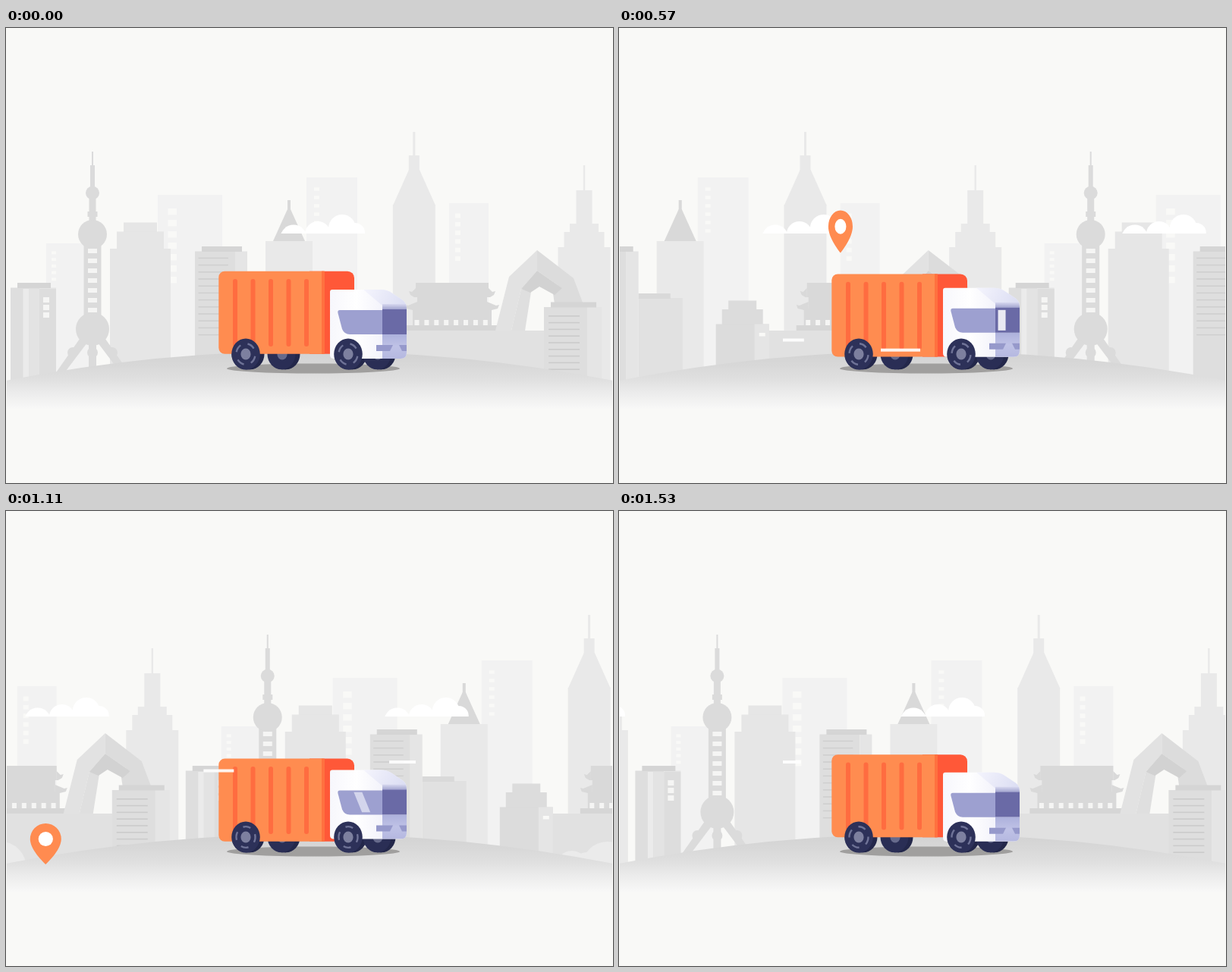
An HTML page with a canvas for the animation above (1560 ms loop, 800 by 600 pixels).

```html
<!DOCTYPE html>
<html lang="en">
<head>
<meta charset="utf-8">
<title>Delivery truck</title>
<style>
html, body { margin: 0; width: 100%; height: 100%; overflow: hidden; background: #f9f9f7; }
canvas { display: block; }
</style>
</head>
<body>
<canvas id="stage" width="800" height="600"></canvas>
<script>
const ctx = document.getElementById('stage').getContext('2d');
const LOOP = 1560, STEP = 30, PAPER = '#f9f9f7', PANE = '#f5f5f4', FLOOR = 468;

function box(color, left, top, right, bottom = FLOOR) {
  ctx.fillStyle = color;
  ctx.fillRect(left, top, right - left, bottom - top);
}
function rounded(color, left, top, right, bottom, radii) {
  ctx.fillStyle = color;
  ctx.beginPath();
  ctx.roundRect(left, top, right - left, bottom - top, radii);
  ctx.fill();
}
function poly(color, ...p) {
  ctx.fillStyle = color;
  ctx.beginPath();
  for (let i = 0; i < p.length; i += 2) ctx.lineTo(p[i], p[i + 1]);
  ctx.fill();
}
function oval(color, x, y, rx, ry = rx) {
  ctx.fillStyle = color;
  ctx.beginPath();
  ctx.ellipse(x, y, rx, ry, 0, 0, Math.PI * 2);
  ctx.fill();
}
function rows(color, left, right, top, height, pitch, count) {
  for (let i = 0; i < count; i++) box(color, left, top + i * pitch, right, top + i * pitch + height);
}
function fade(x0, y0, x1, y1, ...colors) {
  const g = ctx.createLinearGradient(x0, y0, x1, y1);
  colors.forEach((c, i) => g.addColorStop(i / (colors.length - 1), c));
  return g;
}
function clipped(left, top, width, height, paint) {
  ctx.save();
  ctx.beginPath();
  ctx.rect(left, top, width, height);
  ctx.clip();
  paint();
  ctx.restore();
}

function slab(left, top, right, paneX, paneWidth, paneHeight, pitch, count) {
  box('#f2f2f2', left, top, right);
  rows(PAPER, paneX, paneX + paneWidth, top + pitch * 1.2, paneHeight, pitch, count);
}
// Symmetric tower of ever wider tiers, given as pairs of half width and top
function tiers(color, x, ...steps) {
  for (let i = 0; i < steps.length; i += 2) box(color, x - steps[i], steps[i + 1], x + steps[i]);
}
function office(left, edge, right, top) {
  box('#dedede', left, top + 6.5, edge);
  box('#e5e5e5', edge, top + 6.5, right);
  box('#d5d5d5', left + 9, top, right - 7, top + 7);
}

function farSkyline() {
  slab(53, 284, 110, 60, 6, 4, 8.7, 5);
  slab(200, 220, 285, 213.5, 11.5, 8.5, 15, 7);
  slab(396, 197, 463, 406, 7, 4.5, 11, 6);
  slab(584, 231, 636, 592, 7, 6, 11.3, 6);
  tiers('#e9e9e9', 762, 1.2, 181, 10.5, 214, 19, 258, 26.5, 269, 34.5, 289);
  tiers('#e6e6e6', 177, 22, 256.5, 31, 268.5, 40, 291);
  tiers('#e9e9e9', 537.8, 1.5, 137, 7, 168, 28, 233);
  poly('#e9e9e9', 531, 187, 545, 187, 566, 234, 510, 234);
  box('#e9e9e9', 342, 281, 404);
  box('#d9d9d9', 371, 227, 375, 245);
  poly('#d9d9d9', 371, 239, 375, 239, 394, 281, 352, 281);
}

function pearlTower() {
  const c = '#dbdbdb';
  ctx.save();
  ctx.translate(114, 0);
  tiers(c, 0, 1, 163);
  box(c, -3, 181, 3, 212);
  box(c, -4.5, 217, 4.5, 272);
  box(c, -6.5, 242, 6.5, 249);
  box(c, -11.5, 286, 11.5, 380);
  oval(c, 0, 217.5, 9);
  oval(c, 0, 272, 19);
  oval(c, 0, 397, 22);
  rows(PANE, -6, 6, 291, 6, 13, 7);
  box(c, -5, 415, 5);
  for (const side of [-1, 0, 1]) {
    oval(c, side * 26, 428, 7);
    poly(c, side * 17, 410, side * 7, 415, side * 41, 460, side * 52, 460);
  }
  ctx.restore();
}

function nearSkyline() {
  office(249, 302, 318, 288);
  rows('#cfcfcf', 253.5, 293, 302.6, 1.6, 9.2, 12);
  box('#e1e1e1', 318, 356, 376);
  box('#d9d9d9', 318, 350, 360, 357);
  tiers('#dcdcdc', 455, 18.5, 359.5, 27, 371, 35, 390.5);
  box('#e5e5e5', 471, 390.5, 490);
  box(PAPER, 477, 402, 485, 406.5);
  office(6, 44, 66, 336);
  box('#ebebeb', 22.5, 344, 30);
  box('#e3e3e3', 30, 344, 44);
  box('#dddddd', 44, 344, 66);
  rows(PANE, 49, 57, 355, 7, 10, 3);
}

function roof(top, half, eave, reach) {
  const c = '#d9d9d9', x = 588;
  box(c, x - half, top, x + half, eave + 5);
  for (const s of [-1, 1]) {
    poly(c, x + s * half, eave - 7, x + s * (reach - 4), eave - 2, x + s * reach, eave - 3,
      x + s * (reach - 2), eave + 2, x + s * (half + 2), eave + 5, x + s * half, eave + 5);
  }
}
function gate() {
  box('#e1e1e1', 490, 399, 727);
  roof(336, 48, 350, 57);
  roof(352, 46, 368, 62);
  box('#d9d9d9', 536, 370, 640, 393);
  for (let x = 538.5; x < 635; x += 12.9) box(PANE, x, 385, x + 6, 392);
  box('#d6d6d6', 526, 392, 650, 399);
}

function archTower() {
  poly('#e2e2e2', 645, 399, 663, 328, 700, 293, 700, 320, 679, 344, 666, 399);
  poly('#dfdfdf', 666, 399, 679, 344, 692, 348, 684, 399);
  poly('#dcdcdc', 700, 293, 748, 330, 760, 362, 723, 364, 721, 350, 733, 343, 700, 320);
  poly('#d2d2d2', 679, 344, 700, 320, 733, 343, 723, 352, 703, 341, 691, 349);
}

function bushes() {
  oval('#ebebeb', 515, 468, 20);
  oval('#ebebeb', 535, 468, 18);
  oval('#ebebeb', 562, 470, 34);
}

function city(shift) {
  for (const x of [-shift, 800 - shift]) {
    ctx.save();
    ctx.translate(x, 0);
    farSkyline();
    pearlTower();
    nearSkyline();
    gate();
    archTower();
    office(709, 766, 785, 361.5);
    rows('#cbcbcb', 715, 756, 379, 1.6, 8.8, 9);
    bushes();
    ctx.restore();
  }
}

function clouds(t) {
  const gap = 474;
  for (let x = 361 - gap * (1 + t / LOOP); x < 800; x += gap) {
    clipped(x, 240, 113, 31, () => {
      oval('#ffffff', x + 18, 277, 17.5);
      oval('#ffffff', x + 50, 272, 17);
      oval('#ffffff', x + 82, 264, 18);
      oval('#ffffff', x + 99, 270, 13);
      box('#ffffff', x + 35, 265, x + 108, 271);
    });
  }
}

function ground() {
  ctx.fillStyle = fade(0, 426, 0, 502, '#d2d2d2', '#d8d8d8', '#e0e0e0', '#ededed', '#f8f8f7');
  ctx.beginPath();
  ctx.moveTo(0, 502);
  ctx.lineTo(0, 465);
  ctx.quadraticCurveTo(400, 387, 800, 465);
  ctx.lineTo(800, 502);
  ctx.fill();
}

// The pin leaps out of the truck, grows on its way and lands on the road
function pin(t) {
  const landing = 798;
  const x = 203 + (landing - t) * (t < landing ? 0.39 : 0.483);
  const tip = t < landing ? 249.5 + 0.0012 * (t - 372) ** 2 : 466;
  const size = Math.min(1, t / 960) ** 0.47;
  const stretch = t < landing ? 1 + 0.42 * Math.sin(Math.PI * t / landing) : 1;
  ctx.save();
  ctx.translate(x, tip);
  ctx.scale(size, size * stretch);
  ctx.fillStyle = '#ff8b50';
  ctx.beginPath();
  ctx.moveTo(0, 0);
  ctx.bezierCurveTo(-5, -5, -20.5, -20, -20.5, -33.5);
  ctx.arc(0, -33.5, 20.5, Math.PI, 0);
  ctx.bezierCurveTo(20.5, -20, 5, -5, 0, 0);
  ctx.fill();
  oval('#ffffff', 0, -33.5, 9.6);
  ctx.restore();
}

function tread(x, depth) {
  oval('#23274a', x + depth, 430, 18.5, 20.3);
  box('#23274a', x, 409.7, x + depth, 450.3);
  oval('#2a2e55', x, 430, 18.5, 20.3);
}
function wheel(x, angle) {
  oval('#2d3159', x, 430, 18.8, 20.5);
  ctx.strokeStyle = '#6f7397';
  ctx.lineWidth = 2.4;
  for (let a = angle; a < angle + 6; a += Math.PI / 2) {
    ctx.beginPath();
    ctx.ellipse(x, 430, 12.5, 13.8, 0, a - 0.4, a + 0.4);
    ctx.stroke();
  }
  oval('#7d809f', x, 430, 6.6, 7.4);
}

function container() {
  rounded('#ff5838', 400, 320.7, 459, 429.8, [0, 9, 0, 0]);
  rounded('#ff8c50', 280.3, 320.7, 419, 429.8, [8, 0, 0, 8]);
  box('#ff713f', 416, 320.7, 420, 429.8);
  for (let x = 299; x < 400; x += 23.5) rounded('#ff6c40', x, 331, x + 6, 420, 3);
}

// One reflection slides back over the windscreen and then the side window
function glare(t) {
  const x = 548 - t * 0.085;
  clipped(496, 371, 32, 33, () => box('rgba(255,255,255,.85)', x, 374, x + 10, 401));
  clipped(442, 374, 54, 27, () => {
    const left = x + 4.6, width = 14 - Math.max(0, t - 960) * 0.02;
    poly('#d3d5ec', left, 374, left + width, 374, left + width + 11, 401, left + 11, 401);
  });
}

function cab(t) {
  ctx.save();
  ctx.beginPath();
  ctx.moveTo(427, 348);
  ctx.quadraticCurveTo(427, 345, 430, 345);
  ctx.lineTo(494, 345);
  ctx.quadraticCurveTo(502, 345, 508, 349);
  ctx.lineTo(523, 359);
  ctx.quadraticCurveTo(528, 363, 528, 370);
  ctx.lineTo(528, 428);
  ctx.quadraticCurveTo(528, 436, 520, 436);
  ctx.lineTo(432, 436);
  ctx.quadraticCurveTo(427, 436, 427, 431);
  ctx.clip();
  box(fade(427, 0, 496, 0, '#f7f7fc', '#ffffff', '#f3f3fb'), 427, 340, 528, 440);
  poly(fade(470, 345, 520, 372, '#f5f5fd', '#dcdef3'), 470, 344, 528, 344, 528, 366, 496, 366);
  box(fade(0, 363, 0, 372, '#dfe0f4', '#9a9cca'), 496, 364, 528, 372);
  box('#6a6aa6', 496, 371, 528, 404);
  box(fade(0, 404, 0, 436, '#adb1dc', '#bfc2e6', '#b5b8e0'), 496, 404, 528, 436);
  ctx.restore();
  ctx.fillStyle = '#9da0d0';
  ctx.beginPath();
  ctx.moveTo(440, 372);
  ctx.lineTo(496, 372);
  ctx.lineTo(496, 404);
  ctx.lineTo(453, 404);
  ctx.quadraticCurveTo(446, 404, 443, 397);
  ctx.lineTo(437.5, 376);
  ctx.quadraticCurveTo(436.5, 372, 440, 372);
  ctx.fill();
  poly('#9699cb', 488, 418, 510, 418, 506, 426, 488, 426);
  poly('#9699cb', 518, 418, 528, 418, 528, 426, 522, 426);
  glare(t);
}

function shifted(dy, paint) {
  ctx.save();
  ctx.translate(0, dy);
  paint();
  ctx.restore();
}

function truck(t) {
  const bounce = 1 - Math.abs(t % 780 / 390 - 1);
  const angle = 0.6 + t / 780 * Math.PI * 2;
  oval('#a09f9e', 405, 449, 114, 6.5);
  for (const x of [316, 451]) tread(x, 6);
  for (const x of [363, 489]) {
    tread(x, 6);
    oval('#666a8c', x + 1, 430, 6.6, 7.4);
  }
  shifted(bounce * 7, container);
  shifted(bounce * -4, () => cab(t));
  for (const x of [316, 451]) wheel(x, angle);
}

// A streak runs left and is trimmed where its path begins and ends
function streak(age, y, length, speed) {
  const x = 540 - age * speed;
  const left = Math.max(216, x), right = Math.min(540, x + length);
  if (right > left) box('rgba(255,255,255,.9)', left, y - 2, right, y + 2);
}

function draw() {
  const t = Math.floor(performance.now() % LOOP / STEP) * STEP;
  box(PAPER, 0, 0, 800, 600);
  clipped(1, 0, 798, 600, () => {
    clipped(0, 0, 800, FLOOR, () => city(800 * t / LOOP));
    clouds(t);
    ground();
    pin(t);
    truck(t);
    streak(t - 116, 411.5, 57, 0.778);
    streak(t - 262, 424.7, 52, 0.633);
    streak(t - 781, 342.5, 40, 0.85);
    streak(t - 1072, 331, 121, 0.92);
  });
  requestAnimationFrame(draw);
}
draw();
</script>
</body>
</html>
```
